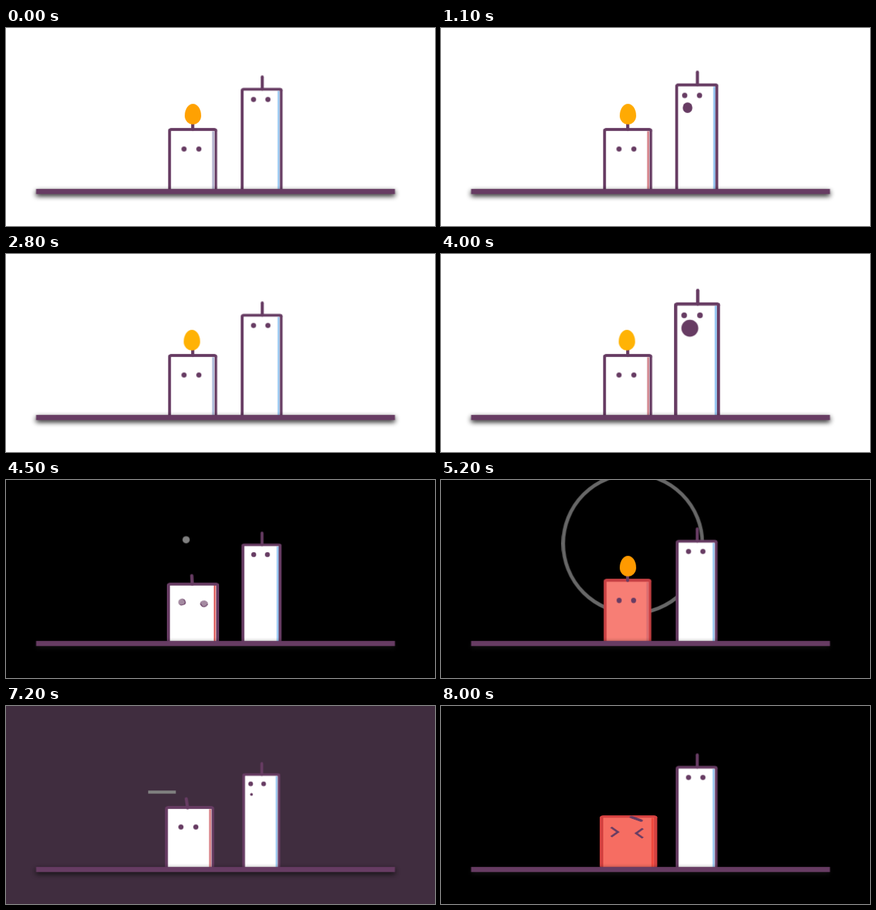
An HTML page that plays this animation: 600x277 px, repeating every 8100 ms.

```html
<!DOCTYPE html>
<html lang="en">
<head>
<meta charset="utf-8">
<title>Two candles</title>
<style>
:root { --ink: #673c63; }
html, body { margin: 0; width: 100%; height: 100%; overflow: hidden; }
body { background: #fff; animation-name: room; }
body, body * { animation-duration: 2.99s; animation-timing-function: linear; animation-iteration-count: infinite; animation-play-state: paused; }
div { position: absolute; }
.scene { left: 292.5px; top: 227.6px; transform-origin: 0 0; transform: scale(1.434); }
.floor { left: -175px; top: -2.5px; width: 350px; height: 5px; background: var(--ink); box-shadow: 0 2px 5px #111; }
.candles { left: -125px; top: -150px; width: 250px; height: 150px; }

.candle { background: #fff; border: 3px solid var(--ink); border-bottom: 0; border-radius: 3px; box-shadow: inset -2px 0 0 #95c6f2; transform-origin: center right; }
.tall { left: 50%; top: 50%; width: 35px; height: 100px; transform: translate(60%, -25%); animation-name: puff; }
.short { left: 20%; top: 65%; width: 42px; height: 60px; transform: translate(60%, -15%); animation-name: shake; }

.wick { left: 50%; top: 0; width: 3px; height: 15px; border-radius: 8px; background: var(--ink); transform: translate(-50%, -100%); }
.short .wick { height: 12px; transform-origin: bottom center; animation-name: wick; }

.eyes { left: 50%; top: 0; width: 35px; height: 30px; transform: translateX(-50%); }
.eye { left: 30%; width: 5px; height: 5px; border: 0 solid var(--ink); border-radius: 100%; background: var(--ink); }
.eye + .eye { left: 70%; }
.tall .eye { top: 20%; transform: translate(-70%, 0); animation-name: blink; }
.short .eye { top: 50%; transform: translate(-90%, 0); transform-origin: bottom left; animation-name: squint-left; }
.short .eye + .eye { transform: translate(-80%, 0); animation-name: squint-right; }

.mouth { left: 40%; top: 20%; width: 0; height: 0; border-radius: 20px; background: var(--ink); transform: translate(-50%, -50%); animation-name: mouth; }
.breath, .smoke, .flame { transform: translate(-50%, -50%); }
.breath { left: 30%; top: 50%; height: 3px; background: gray; animation-name: breath; }
.smoke { left: 30%; top: 40%; border-radius: 10px; background: gray; animation-name: smoke; }
.flame { left: 40.8%; top: 50%; border-radius: 50% / 58% 58% 42% 42%; animation-name: flame; }
.glow { left: 35%; top: 35%; width: 75px; height: 75px; border: 2px solid #fff3; border-radius: 100%; animation-name: glow; }

@keyframes room {
  0%, 59%, 98%, 100% { background: #fff; }
  60.7% { background: #402d3f; }
  61%, 97% { background: #000; }
}
@keyframes puff {
  0%, 40%, 65%, 75%, 100% { transform: scale(1) translate(60%, -25%); }
  45%, 55% { transform: scale(1.1) translate(60%, -28%); }
  60% { transform: scale(.89) translate(60%, -25%); }
  70% { transform: scale(.95) translate(60%, -25%); }
}
@keyframes blink {
  0%, 35% { opacity: 1; transform: translate(-70%, 0); }
  36%, 39% { opacity: 0; }
  40% { opacity: 1; }
  50%, 65% { transform: translate(-140%, 0); }
  66%, 100% { transform: translate(-70%, 0); }
}
@keyframes mouth {
  0%, 40% { width: 0; height: 0; }
  50%, 54% { width: 15px; height: 15px; left: 30%; }
  59% { width: 5px; height: 5px; left: 20%; }
  62% { width: 2px; height: 2px; left: 20%; }
  67%, 100% { width: 0; height: 0; left: 30%; }
}
@keyframes breath {
  0%, 59%, 100% { width: 0; left: 40%; }
  60% { width: 30px; left: 30%; }
  68% { width: 0; left: 20%; }
}
@keyframes smoke {
  0%, 64%, 100% { width: 0; height: 0; top: 0; }
  65% { width: 10px; height: 10px; top: 40%; left: 40%; }
  80% { width: 0; height: 0; top: 20%; }
}
@keyframes shake {
  0%, 59% { left: 20%; }
  62% { left: 18%; }
  65% { left: 21%; }
  67%, 100% { left: 20%; }
  0%, 67%, 97%, 100% { transform: scale(1, 1) translate(60%, -15%); }
  75% { transform: scale(1.15, .85) translate(60%, -15%); background: #fff; border-color: var(--ink); }
  91% { transform: scale(1.18, .82) translate(60%, -10%); background: #f44336; border-color: #f44336; box-shadow: inset -2px 0 0 #f44336; }
  92% { transform: scale(.85, 1.15) translate(60%, -15%); }
  95% { transform: scale(1.05, .95) translate(60%, -15%); }
}
@keyframes wick {
  0%, 59%, 74%, 84% { transform: rotate(0deg) translate(-50%, -100%); }
  62% { transform: rotate(-15deg) translate(-50%, -100%); }
  65% { transform: rotate(15deg) translate(-50%, -100%); }
  70% { transform: rotate(-5deg) translate(-50%, -100%); }
  72% { transform: rotate(5deg) translate(-50%, -100%); }
  85% { transform: translate(0, -120%) rotate(180deg); }
  92%, 100% { transform: translate(-50%, -100%) rotate(0deg); }
}
@keyframes squint-left {
  0%, 70%, 90%, 100% { transform: translate(-90%, 0); }
  71%, 89% { padding: 1px; background: transparent; border-width: 0 2px 2px 0; border-radius: 0; transform: rotate(-45deg) translate(-50%, -65%); }
  0%, 70%, 90%, 100% { padding: 0; background: var(--ink); border-width: 0; border-radius: 100%; }
}
@keyframes squint-right {
  0%, 70%, 90%, 100% { transform: translate(-80%, 0); }
  71%, 89% { padding: 1px; background: transparent; border-width: 0 2px 2px 0; border-radius: 0; transform: rotate(135deg) translate(-125%, 67%); }
  0%, 70%, 90%, 100% { padding: 0; background: var(--ink); border-width: 0; border-radius: 100%; }
}
@keyframes flame {
  59%, 89% { left: 40%; width: 0; height: 0; }
  0%, 7%, 15%, 23%, 31%, 39%, 47%, 55%, 90%, 100% { left: 40.8%; width: 16px; height: 20px; background: #ffc107; }
  3%, 11%, 19%, 27%, 35%, 43%, 51%, 58%, 94% { left: 41.2%; width: 16px; height: 20px; background: #ff9800; }
}
@keyframes glow {
  10%, 29%, 59%, 89% { transform: translate(-25%, -50%) scale(0); border-color: #fff0; }
  20%, 50%, 90% { transform: translate(-25%, -50%) scale(1); }
  26%, 27%, 56%, 57%, 95%, 96% { transform: translate(-25%, -50%) scale(2); border-color: #ffffff80; }
  0%, 28%, 58%, 100% { transform: translate(-25%, -50%) scale(2.5); border-color: #fff3; }
}
</style>
</head>
<body>
<div class="scene">
  <div class="candles">
    <div class="glow"></div>
    <div class="candle tall">
      <div class="wick"></div>
      <div class="eyes"><div class="eye"></div><div class="eye"></div></div>
      <div class="mouth"></div>
    </div>
    <div class="breath"></div>
    <div class="smoke"></div>
    <div class="candle short">
      <div class="wick"></div>
      <div class="eyes"><div class="eye"></div><div class="eye"></div></div>
    </div>
    <div class="flame"></div>
  </div>
  <div class="floor"></div>
</div>
<script>
const LOOP = 8100, STEP = 100, OFFSET = 595;
const anims = document.getAnimations();
let start;

// Every keyframe track is paused and placed by the clock, in 100 ms steps.
function seek(ms) {
  const t = Math.floor(ms % LOOP / STEP) * STEP + OFFSET;
  for (const a of anims) a.currentTime = t;
}
function tick(now) {
  start ??= now;
  seek(now - start);
  requestAnimationFrame(tick);
}
seek(0);
requestAnimationFrame(tick);
</script>
</body>
</html>
```
